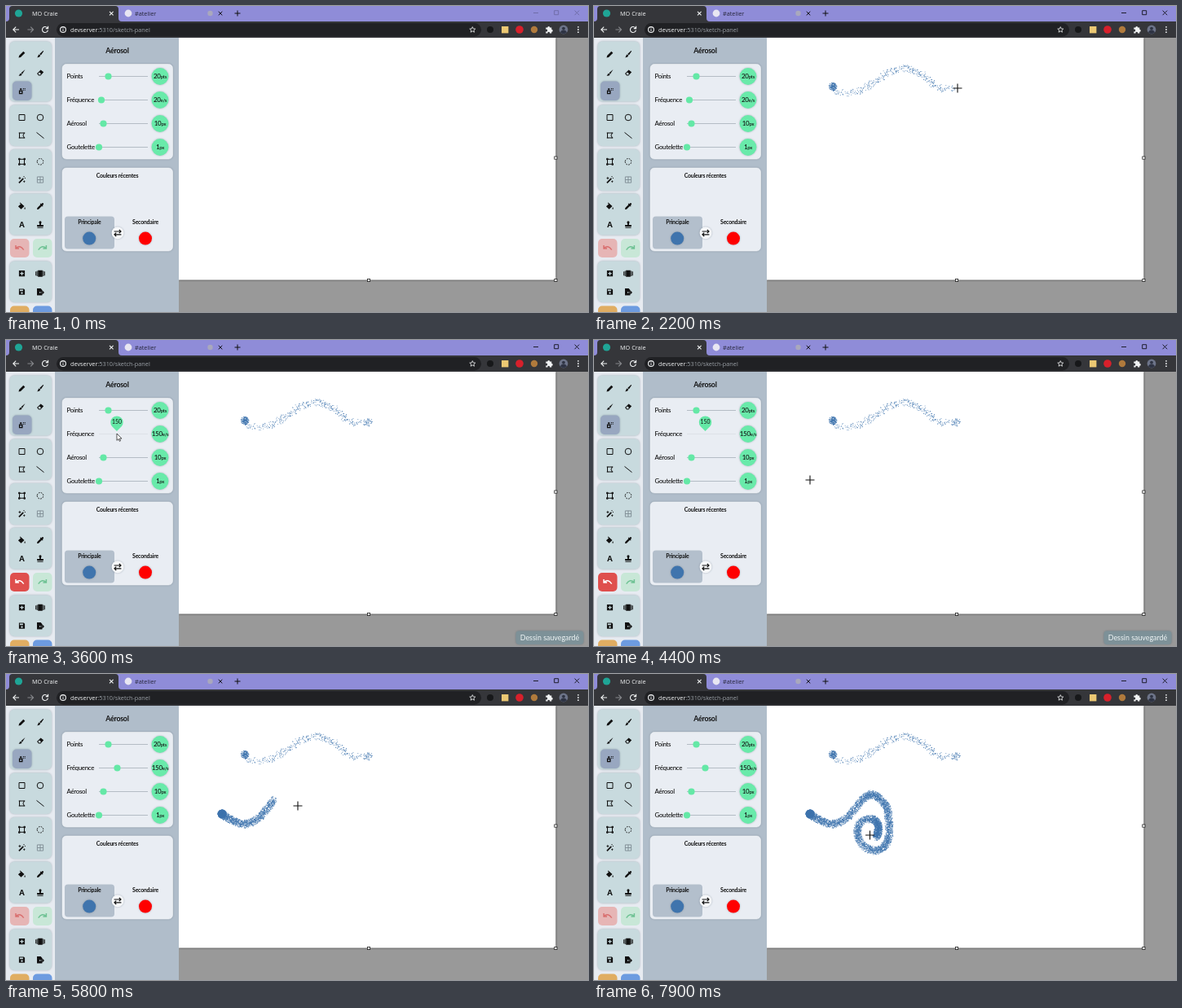
These frames come from a looping animation (714x376 px, 8000 ms). An HTML page with a canvas:

```html
<!DOCTYPE html>
<html lang="fr">
<head>
<meta charset="utf-8">
<title>Aérosol</title>
<style>
  html, body { margin: 0; width: 100%; height: 100%; overflow: hidden; background: #999; }
  svg, canvas { position: absolute; left: 0; top: 0; width: 714px; height: 376px; display: block; }
  text { font-family: Lato, "Open Sans", sans-serif; fill: #111; }
  .bar text { font-family: "Open Sans", "Noto Sans", sans-serif; font-size: 7.3px; }
  .label { font-size: 7.9px; font-weight: 500; letter-spacing: -.32px; }
  .head { font-size: 6.9px; font-weight: 700; letter-spacing: -.2px; text-anchor: middle; }
  .title { font-size: 8.8px; font-weight: 700; letter-spacing: -.25px; text-anchor: middle; }
  .value { font-size: 8px; font-weight: 500; letter-spacing: -.3px; text-anchor: middle; }
  .unit { font-size: 6.1px; }
  .panel { fill: #c8dade; }
  .card { fill: #e9edf3; stroke: #f3f6f9; stroke-width: .6; }
  .soft { filter: drop-shadow(0 .4px .9px rgba(40, 55, 75, .32)); }
  .line { fill: none; stroke: #111; stroke-width: 1; }
  .white { fill: none; stroke: #f1f3f4; stroke-width: 1.1; }
  #undo.off rect { fill: #e6b5b5; }
  #undo.off path { stroke: #d96f6f; }
  #undo rect { fill: #df4f4d; }
  #undo path { stroke: #fff; }
</style>
</head>
<body>
<svg viewBox="0 0 714 376">
  <!-- workspace -->
  <rect width="714" height="376" fill="#999"/>
  <rect x="212" y="39" width="462.4" height="297.6" fill="#fff" style="filter:drop-shadow(.8px .8px .8px #222)"/>
  <g fill="#fff" stroke="#222" stroke-width=".8">
    <rect x="672.8" y="185" width="3.2" height="3.2"/>
    <rect x="443.4" y="335.4" width="3.2" height="3.2"/>
    <rect x="672.8" y="335.4" width="3.2" height="3.2"/>
  </g>

  <!-- browser -->
  <g class="bar">
    <rect width="714" height="19" fill="#8f8cd8"/>
    <path d="M0 19Q4 19 4 15V4Q4 0 8 0H134Q138 0 138 4V15Q138 19 142 19z" fill="#35363a"/>
    <rect y="19" width="714" height="20" fill="#35363a"/>
    <circle cx="15.5" cy="9" r="4.6" fill="#1fa596"/>
    <text x="32" y="11.8" style="fill:#f1f3f4">MO Craie</text>
    <path class="white" d="M127 6.8l4.6 4.6m0-4.6l-4.6 4.6"/>
    <circle cx="150" cy="9" r="4.4" fill="#e8e6f2"/>
    <text x="158" y="11.8" style="fill:#26263a">#atelier</text>
    <circle cx="250.5" cy="9" r="3.2" fill="#a9a8bd"/>
    <path class="line" d="M260.7 6.8l4.6 4.6m0-4.6l-4.6 4.6M280.5 9h7M284 5.5v7"/>
    <path id="win" class="line" d="M647 8.5h6M672.7 5.7h5v5h-5zM697.6 5.6l5.6 5.6m0-5.6l-5.6 5.6"/>
    <path class="white" d="M16 29H8.8m3.4-3.4L8.8 29l3.4 3.4"/>
    <path class="white" d="M26.4 29h7.2m-3.4-3.4l3.4 3.4-3.4 3.4" style="stroke:#85878b"/>
    <path class="white" d="M50.8 27a3.5 3.5 0 1 0 .6 2.6M51.6 24.8v2.8h-2.8"/>
    <rect x="62" y="21" width="521" height="16.5" rx="8.2" fill="#202124"/>
    <circle class="white" cx="70" cy="29" r="3.4" stroke-width=".9"/>
    <path class="white" d="M70 28.4v2.4M70 26.6v1"/>
    <text x="79" y="32" style="fill:#f1f3f4">devserver<tspan fill="#9aa0a6">:5310/sketch-panel</tspan></text>
    <path class="white" d="M572.3 25.6l1 2.3 2.5.2-1.9 1.7.6 2.4-2.2-1.3-2.2 1.3.6-2.4-1.9-1.7 2.5-.2z" style="stroke-width:.8"/>
    <circle cx="594" cy="29" r="4" fill="#17181a"/>
    <rect x="608" y="25" width="8.4" height="8.4" fill="#ecc873"/>
    <circle cx="630" cy="29" r="4.8" fill="#d8202b"/>
    <circle cx="648" cy="29" r="4.2" fill="#b07a3c"/>
    <path d="M662.3 26.6h2a1.5 1.5 0 1 1 3 0h2v2.2a1.5 1.5 0 1 1 0 3v1.7h-2.3a1.3 1.3 0 1 0-2.5 0h-2.2v-2.2a1.4 1.4 0 1 0 0-2.6z" fill="#f1f3f4"/>
    <circle cx="684" cy="29" r="5.4" fill="#6d7489"/>
    <path d="M680 32.6a5.4 5.4 0 0 0 8 0q-1-3-4-3t-4 3z" fill="#2f3444"/>
    <circle cx="684" cy="27.6" r="1.9" fill="#2f3444"/>
    <g fill="#f1f3f4"><circle cx="702" cy="25.8" r=".9"/><circle cx="702" cy="29" r=".9"/><circle cx="702" cy="32.2" r=".9"/></g>
  </g>

  <!-- tool column -->
  <rect y="39" width="60" height="337" fill="#e7ebf1"/>
  <g class="soft">
    <rect class="panel" x="4.5" y="43.5" width="51.5" height="74" rx="6"/>
    <rect class="panel" x="4.5" y="121.5" width="51.5" height="50.5" rx="6"/>
    <rect class="panel" x="4.5" y="176" width="51.5" height="51" rx="6"/>
    <rect class="panel" x="4.5" y="230.5" width="51.5" height="51" rx="6"/>
    <rect class="panel" x="4.5" y="313.5" width="51.5" height="50.5" rx="6"/>
  </g>
  <rect class="soft" x="8" y="92.5" width="23.5" height="23.5" rx="5" fill="#98a7c0"/>
  <g id="undo" class="off">
    <rect x="5" y="286" width="23.5" height="23" rx="5"/>
    <path d="M12 294v4h4M12.3 297.6q4.6-4.6 9.4 2" fill="none" stroke-width="1.5"/>
  </g>
  <rect x="33" y="286" width="23.5" height="23" rx="5" fill="#c8e7d7"/>
  <path d="M49.4 294v4h-4M49.1 297.6q-4.6-4.6-9.4 2" fill="none" stroke="#6fc294" stroke-width="1.5"/>
  <rect x="5" y="368.5" width="23.5" height="23" rx="5" fill="#e0ad62"/>
  <rect x="33" y="368.5" width="23.5" height="23" rx="5" fill="#6d9be0"/>
  <g id="icons"></g>

  <!-- options -->
  <rect x="60" y="39" width="152" height="337" fill="#b0bdca"/>
  <text class="title" x="136.5" y="58">Aérosol</text>
  <rect class="card soft" x="69" y="71.5" width="135.5" height="116.5" rx="5"/>
  <g id="rows"></g>
  <rect class="card soft" x="69" y="199" width="135.5" height="102" rx="5"/>
  <text class="head" x="136.5" y="211">Couleurs récentes</text>
  <rect x="72" y="258.5" width="61" height="40" rx="4" fill="#b3bfcc"/>
  <text class="head" x="102.3" y="268.3">Principale</text>
  <text class="head" x="171" y="268.3">Secondaire</text>
  <circle class="soft" cx="102.2" cy="285.6" r="8" fill="#3f74ad"/>
  <circle class="soft" cx="171" cy="285.6" r="8" fill="#f00"/>
  <circle class="soft" cx="137" cy="278.8" r="7.4" fill="#f6f8fa"/>
  <path class="line" d="M132.6 277h8.4m-2.2-2.2l2.2 2.2-2.2 2.2M141.4 280.8h-8.4m2.2-2.2l-2.2 2.2 2.2 2.2" style="stroke-width:1.2"/>
  <g id="bubble">
    <path d="M0 11L-5.8 5.2A7.7 7.7 0 1 1 5.8 5.2z" fill="#64e8a6"/>
    <text id="bubbleText" y="2.4" style="font-size:6.8px;text-anchor:middle"></text>
  </g>
  <g id="toast">
    <rect class="soft" x="625.5" y="357.5" width="83" height="16.5" rx="4" fill="#7d9198"/>
    <text x="667" y="368.9" style="font-size:8.9px;text-anchor:middle;fill:#eff5f6">Dessin sauvegardé</text>
  </g>
</svg>
<canvas id="spray" width="714" height="376"></canvas>
<svg viewBox="0 0 714 376">
  <path id="cross" d="M-5.5 0H5.5M0-5.5V5.5" stroke="#111" stroke-width="1.1"/>
  <path id="arrow" d="M0 0V8.4L2 6.6 3.3 9.4 4.6 8.8 3.4 6.1H6z" fill="#fff" stroke="#111" stroke-width=".7"/>
</svg>
<script>
const LOOP = 8000, STEP = 100, LAG = 400;
const $ = id => document.getElementById(id);
const clamp = (v, a, b) => Math.min(b, Math.max(a, v));

// Icons are drawn around 0,0; s marks outlined ones
const icons = [
  [19.5, 59.5, 'M-4 4L-3.4 1.5 1.8-3.8 3.8-1.8-1.5 3.4z'],
  [42, 59.5, 'M4.2-4L3.4-4.4-.8-.6.8 1zM-1.2 0L.2 1.5Q-.6 4-4 3.8-2.6 2.8-2.6 1.6-2.2.2-1.2 0z'],
  [19.5, 82, 'M4-4L-1 .2.4 1.7zM-1.5.7L.1 2.2Q-1 4.4-4 3.7-2.8 2.8-2.7 1.7z'],
  [42, 82, 'M-4 1L.6-3.6 4.2-.8.4 3.4H-2zM-2.7 1L-1.4 2.4H0L1 1.3-.9-.6z'],
  [19.5, 104.3, 'M-3.6-.8H1V4H-3.6zM-2.4-3H-.2V-1.3H-2.4zM-2.2.6V2.6H-.4V.6zM1.4-3.4h1v1h-1zM3.2-3.4h1v1h-1zM1.4-1.6h1v1h-1zM3.2-1.6h1v1h-1z'],
  [19.5, 137, 'M-3.5-3.5h7v7h-7z', 's'],
  [42, 137, 'M-3.8 0a3.8 3.8 0 1 0 7.6 0a3.8 3.8 0 1 0-7.6 0z', 's'],
  [19.5, 159, 'M-3-3L3-3 1.4 0 3 3H-3zM-3.8-3h1.6M2.2-3h1.6M-3.8 3h1.6M2.2 3h1.6', 's'],
  [42, 159, 'M-4.5-3.6L4.5 3.6', 's'],
  [19.5, 191.3, 'M-3-3H3V3H-3zM-4-4h1.6v1.6H-4zM2.4-4H4v1.6H2.4zM-4 2.4h1.6V4H-4zM2.4 2.4H4V4H2.4z', 's'],
  [42, 191.3, 'M-3.8 0a3.8 3.8 0 1 0 7.6 0a3.8 3.8 0 1 0-7.6 0z', 'd'],
  [19.5, 213.5, 'M-4.2 3.2L1.2-2.2 2.4-1-3 4.4zM2-4.4h1v1.2H2zM3.4-2.6h1v1h-1zM-2.6-4l.6 1.4L-.6-2-2-1.4-2.6 0-3.2-1.4-4.6-2-3.2-2.6zM2.8.6L3.3 1.7 4.4 2.2 3.3 2.7 2.8 3.8 2.3 2.7 1.2 2.2 2.3 1.7z'],
  [42, 213.5, 'M-3.6-3.6H3.6V3.6H-3.6zM-3.6 0H3.6M0-3.6V3.6', 'g'],
  [19.5, 246, 'M-2-4.4L3 0-1 3.8-4.6.2-1.4-2.8-2.8-3.8zM3.6 1Q5 3.8 3.6 3.8T3.6 1z'],
  [42, 246, 'M-4 4L-3.6 2 .4-2 -.3-2.7.5-3.5 1.3-2.7 2.7-4.1Q4.6-4 4.1-2.2L2.8-1 3.6-.2 2.8.6 2-.2-2 3.7z'],
  [42, 268.5, 'M-1.4-3.6Q0-5 1.4-3.6 1.8-2.4.9-.8V.6H3.9V2.6H-3.9V.6H-.9V-.8Q-1.8-2.4-1.4-3.6zM-3.6 3.2H3.6V4.2H-3.6z'],
  [19.5, 328.7, 'M-3.6-3.6H3.6V3.6H-3.6zM-.6-2.2V-.6H-2.2V.6H-.6V2.2H.6V.6H2.2V-.6H.6V-2.2z'],
  [42, 328.7, 'M-2.8-4H2.8V4H-2.8zM-4.3-3.2h1v6.4h-1zM3.3-3.2h1v6.4h-1zM-5.8-2.5h1v5h-1zM4.8-2.5h1v5h-1z'],
  [19.5, 351.2, 'M-3.6-3.6H2.4L3.6-2.4V3.6H-3.6zM-2.6-2.6V-1H1.4V-2.6zM-1.2 1.4a1.2 1.2 0 1 0 2.4 0a1.2 1.2 0 1 0-2.4 0z'],
  [42, 351.2, 'M-4-4.2H.6L2.4-2.2V0H-1V1.6H2.4V4.2H-4zM2.6-1.6L5 .8 2.6 3.2V1.4H0V.2H2.6z']
];
const iconStyle = {
  s: 'fill="none" stroke="#111"',
  d: 'fill="none" stroke="#111" stroke-dasharray="1.6 1.4"',
  g: 'fill="none" stroke="#7d8b92" stroke-width=".9"'
};
$('icons').innerHTML = icons.map(([x, y, d, s]) =>
  `<path transform="translate(${x} ${y})" d="${d}" fill-rule="evenodd" ${iconStyle[s] || 'fill="#111"'}/>`).join('') +
  '<text x="19.5" y="271.8" style="font-size:9px;font-weight:900;text-anchor:middle">A</text>';

const rows = [
  ['Points', 125.5, 20, 'pts'], ['Fréquence', 117, 20, 'e/s'],
  ['Aérosol', 119.5, 10, 'px'], ['Goutelette', 114, 1, 'px']
];
$('rows').innerHTML = rows.map(([name, x, val, unit], i) => {
  const y = 86.5 + i * 29;
  return `<text class="label" x="74.5" y="${y + 2.8}">${name}</text>
    <path id="track${i}" d="M114 ${y}H174" stroke="#b4bcc5" stroke-width="1.1"/>
    <circle id="thumb${i}" cx="${x}" cy="${y}" r="4.1" fill="#64e8a6"/>
    <circle class="soft" cx="189" cy="${y}" r="10.4" fill="#69eaaa"/>
    <text class="value" x="189" y="${y + 2.8}"><tspan id="val${i}">${val}</tspan><tspan class="unit">${unit}</tspan></text>`;
}).join('');

// Pointer track: time, x, y
const track = [
  [300, 470, 350], [600, 293, 99], [850, 293, 99], [920, 300, 105], [1000, 320, 106],
  [1150, 345, 93], [1280, 364, 80], [1400, 383, 77], [1560, 405, 86], [1700, 422, 100],
  [1850, 446, 101], [2300, 446, 101], [2700, 128, 117], [2800, 128, 117], [3000, 117, 115],
  [3150, 117, 115], [3650, 136.5, 115], [3850, 136.5, 115], [4200, 265, 172], [4650, 265, 172],
  [4900, 280, 181], [5050, 296, 184], [5200, 312, 175], [5400, 329, 155], [5550, 341, 148],
  [5800, 358, 162], [6000, 362, 184], [6150, 361, 202], [6300, 354, 214], [6400, 344, 217],
  [6500, 333, 213], [6600, 325, 202], [6750, 324, 188], [6850, 332, 179], [7000, 345, 180],
  [7200, 349, 189], [7500, 346, 200], [7900, 338.5, 198]
];
const last = track.length - 1;

function slope(i, k) {
  const p = track[i - 1], c = track[i], n = track[i + 1];
  if (!p || !n) return 0;
  const still = q => q[1] === c[1] && q[2] === c[2];
  return still(p) || still(n) ? 0 : (n[k] - p[k]) / (n[0] - p[0]);
}

function pointer(t) {
  t = clamp(t, track[0][0], track[last][0]);
  let i = 0;
  while (i < last - 1 && t > track[i + 1][0]) i++;
  const a = track[i], b = track[i + 1], h = b[0] - a[0], u = (t - a[0]) / h;
  return [1, 2].map(k =>
    (1 + 2 * u) * (1 - u) ** 2 * a[k] + u * (1 - u) ** 2 * h * slope(i, k) +
    u * u * (3 - 2 * u) * b[k] + u * u * (u - 1) * h * slope(i + 1, k));
}

let seed = 7;
function rand() {
  seed = (seed * 1664525 + 1013904223) % 4294967296;
  return seed / 4294967296;
}

// Droplets follow the pointer with a delay, starting where it was pressed
function stroke(from, to, perSecond, radius) {
  const n = Math.round((to - from) * perSecond / 1000);
  return Array.from({ length: n }, (_, i) => {
    const t = from + (to - from) * i / n;
    const [x, y] = pointer(Math.max(from, t - LAG));
    const r = radius * rand() ** .65, a = rand() * 2 * Math.PI;
    return { t, x: x + r * Math.cos(a), y: y + r * Math.sin(a) };
  });
}
const drops = [...stroke(850, 2300, 420, 5), ...stroke(4450, LOOP, 1900, 5.2)];
const ctx = $('spray').getContext('2d');

const show = (el, on) => { el.style.display = on ? '' : 'none'; };
const within = (t, a, b) => t >= a && t < b;

function draw(t) {
  ctx.clearRect(0, 0, 714, 376);
  ctx.fillStyle = '#3f74ad';
  for (const d of drops) {
    if (d.t > t) break;
    ctx.fillRect(d.x - .4, d.y - .4, .8, .8);
  }

  const [x, y] = pointer(t);
  const inCanvas = x > 212 && x < 675 && y > 40 && y < 337;
  show($('cross'), t >= 300 && inCanvas);
  show($('arrow'), t >= 300 && !inCanvas);
  for (const id of ['cross', 'arrow']) $(id).setAttribute('transform', `translate(${x} ${y})`);

  $('win').style.stroke = t < 300 ? '#6f6da8' : '#1d1d2b';
  $('undo').setAttribute('class', within(t, 2300, 4500) ? '' : 'off');

  const pos = t < 3150 ? 117 : t < 3650 ? pointer(t)[0] : 136.5;
  const freq = Math.round((pos - 114) / 60 * 40) * 10;
  const held = within(t, 3050, 4500);
  $('thumb1').setAttribute('cx', pos);
  show($('thumb1'), !held);
  $('track1').setAttribute('stroke', held ? '#dce1e7' : '#b4bcc5');
  $('val1').textContent = freq;
  show($('bubble'), held);
  $('bubble').setAttribute('transform', `translate(${pos} 101)`);
  $('bubbleText').textContent = freq;

  const enter = clamp((t - 2350) / 150, 0, 1);
  $('toast').setAttribute('opacity', enter * clamp((5500 - t) / 100, 0, 1));
  $('toast').setAttribute('transform', `translate(667 366) scale(${.8 + .2 * enter}) translate(-667 -366)`);
}

function tick() {
  const t = performance.now() % LOOP;
  draw(Math.floor(t / STEP) * STEP);
  requestAnimationFrame(tick);
}
tick();
</script>
</body>
</html>
```
